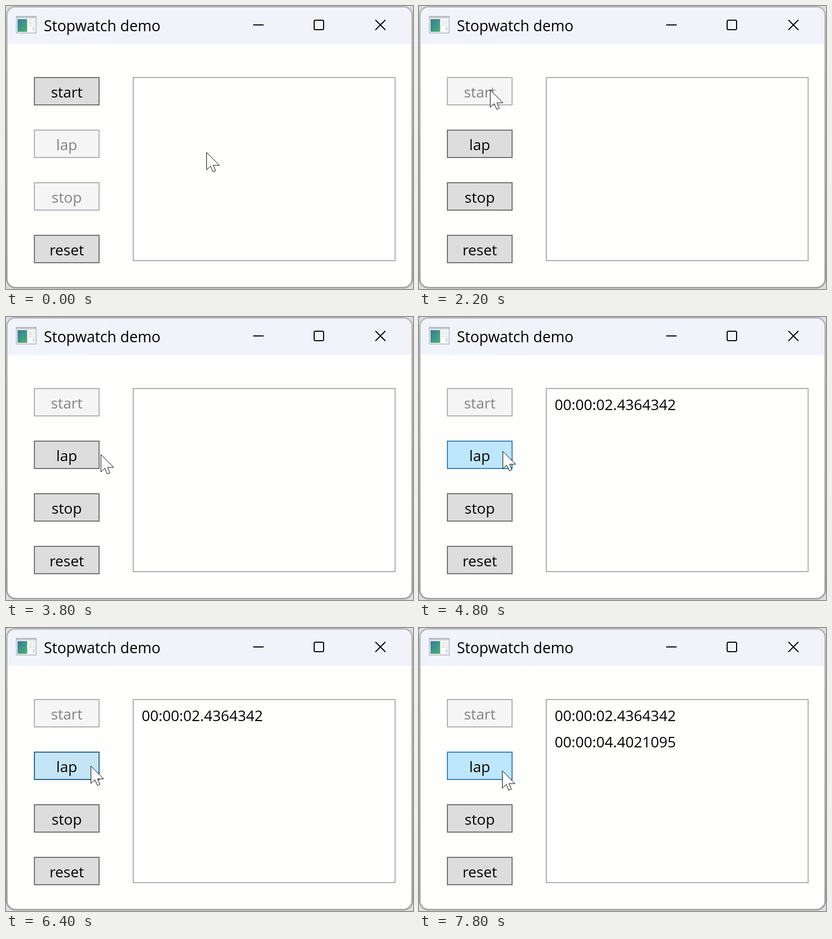
An HTML page that plays this animation: 774x538 px, repeating every 8 s.

```html
<!DOCTYPE html>
<html lang="en">
<head>
<meta charset="utf-8">
<title>Stopwatch demo</title>
<style>
  html, body { margin: 0; width: 100%; height: 100%; overflow: hidden; background: #dededf; }
  svg { display: block; width: 774px; height: 538px; }
  text { font: 28px "Open Sans", "Noto Sans", sans-serif; fill: #000; }
</style>
</head>
<body>
<svg viewBox="0 0 774 538">
  <defs>
    <linearGradient id="edge" x2="0" y2="1">
      <stop offset="0" stop-color="#b7b7bc"/>
      <stop offset="1" stop-color="#a2a2a2"/>
    </linearGradient>
    <linearGradient id="bar">
      <stop offset="0" stop-color="#f0f4fa"/>
      <stop offset=".3" stop-color="#f2f2fb"/>
    </linearGradient>
    <linearGradient id="pane" x2="1" y2="1">
      <stop offset="0" stop-color="#3b74a0"/>
      <stop offset=".55" stop-color="#3f9a86"/>
      <stop offset="1" stop-color="#4fae6c"/>
    </linearGradient>
    <clipPath id="frame"><rect x="3" y="3" width="768" height="531" rx="15"/></clipPath>
  </defs>

  <rect width="774" height="537" rx="18" fill="url(#edge)"/>
  <g clip-path="url(#frame)">
    <rect width="774" height="538" fill="#fefefd"/>
    <rect width="774" height="72" fill="url(#bar)"/>
  </g>

  <g id="icon">
    <rect x="19.5" y="19.5" width="38" height="32" fill="#e9edef" stroke="#a3a8ac"/>
    <path d="M20 21.5H57" stroke="#c3c9cd" stroke-width="3"/>
    <rect x="22" y="25" width="18" height="24" fill="url(#pane)"/>
    <rect x="42" y="25" width="13" height="24" fill="#fafbfb"/>
    <path d="M44 28.500h5M44 32.500h5M44 36.500h5M51 28.500h3M51 32.500h3M51 36.500h3" stroke="#b4bcc2"/>
    <path d="M51 40h3v7h-3z" fill="#cfd8dc"/>
  </g>
  <text x="72" y="48" style="font-size:28.300px">Stopwatch demo</text>
  <g fill="none" stroke="#000" stroke-width="2">
    <path d="M470 36H490M702.500 26.500L721.500 45.500M721.500 26.500L702.500 45.500"/>
    <rect x="586" y="27" width="18" height="18" rx="2.500"/>
  </g>

  <g id="buttons" text-anchor="middle" stroke-width="2"></g>
  <rect x="242" y="136" width="498" height="348" fill="#fefefd" stroke="#abadb0" stroke-width="2"/>
  <text id="lap1" x="258" y="177">00:00:02.4364342</text>
  <text id="lap2" x="258" y="227">00:00:04.4021095</text>
  <rect id="speck" width="1.500" height="1" fill="#111"/>
  <path id="cursor" d="M.5 .5V33.500L8 26.500L12.800 37.500L17.700 35.400L13.200 24.900H24.700Z" fill="#fff" stroke="#000"/>
</svg>
<script>
const LOOP = 8000, STEP = 200;
const $ = id => document.getElementById(id);

// fill, border, label
const LOOK = {
  normal:   ['#dddddd', '#707070', '#000'],
  hover:    ['#bee6fd', '#3c7fb1', '#000'],
  pressed:  ['#c4e5f6', '#2c628b', '#000'],
  disabled: ['#f5f5f5', '#adb0b2', '#838383']
};

// time, x, y of the pointer tip
const PATH = [
  [0, 381, 278], [600, 381, 278], [1200, 184, 152], [1400, 152, 155],
  [1800, 135, 159], [3000, 135, 159], [3600, 186, 240], [3800, 180, 261],
  [4200, 159, 255], [5000, 159, 255], [5400, 201, 262], [5800, 161, 262],
  [6800, 161, 262], [7200, 222, 271], [7600, 165, 271], [7800, 158, 271], [LOOP, 158, 271]
];
const STARTED = 2200, LAP1 = 4600, LAP2 = 6600;
const PRESSES = [[1900, STARTED], [4400, LAP1], [6200, LAP2]];

const buttons = ['start', 'lap', 'stop', 'reset'].map((name, i) => {
  const add = (tag, attrs) => {
    const el = document.createElementNS('http://www.w3.org/2000/svg', tag);
    for (const k in attrs) el.setAttribute(k, attrs[k]);
    return $('buttons').appendChild(el);
  };
  const y = 136 + 100 * i;
  const box = add('rect', { x: 54, y, width: 123, height: 52 });
  const label = add('text', { x: 115.5, y: y + 38 });
  label.textContent = name;
  return { name, y, box, label };
});

function pointerAt(t) {
  const i = PATH.findIndex(p => p[0] > t);
  const [t0, x0, y0] = PATH[i - 1], [t1, x1, y1] = PATH[i];
  const k = (t - t0) / (t1 - t0), e = k * k * (3 - 2 * k);
  return [Math.round(x0 + (x1 - x0) * e), Math.round(y0 + (y1 - y0) * e)];
}

function stateOf(b, t, x, y) {
  const running = t >= STARTED;
  const enabled = b.name === 'reset' || (b.name === 'start') !== running;
  if (!enabled) return 'disabled';
  const over = x >= 53 && x < 178 && y >= b.y - 1 && y < b.y + 53;
  if (!over) return 'normal';
  return PRESSES.some(([from, to]) => t >= from && t < to) ? 'pressed' : 'hover';
}

function show(id, on) {
  $(id).setAttribute('visibility', on ? 'visible' : 'hidden');
}

function draw(ms) {
  const t = Math.floor(ms % LOOP / STEP) * STEP;
  const [x, y] = pointerAt(t);
  $('cursor').setAttribute('transform', `translate(${x} ${y})`);
  for (const b of buttons) {
    const [fill, border, ink] = LOOK[stateOf(b, t, x, y)];
    b.box.setAttribute('fill', fill);
    b.box.setAttribute('stroke', border);
    b.label.style.fill = ink;
  }
  show('lap1', t >= LAP1);
  show('lap2', t >= LAP2);
  show('speck', t >= 4200);
}

const begin = performance.now();
function tick() {
  draw(performance.now() - begin);
  requestAnimationFrame(tick);
}
tick();
</script>
</body>
</html>
```
